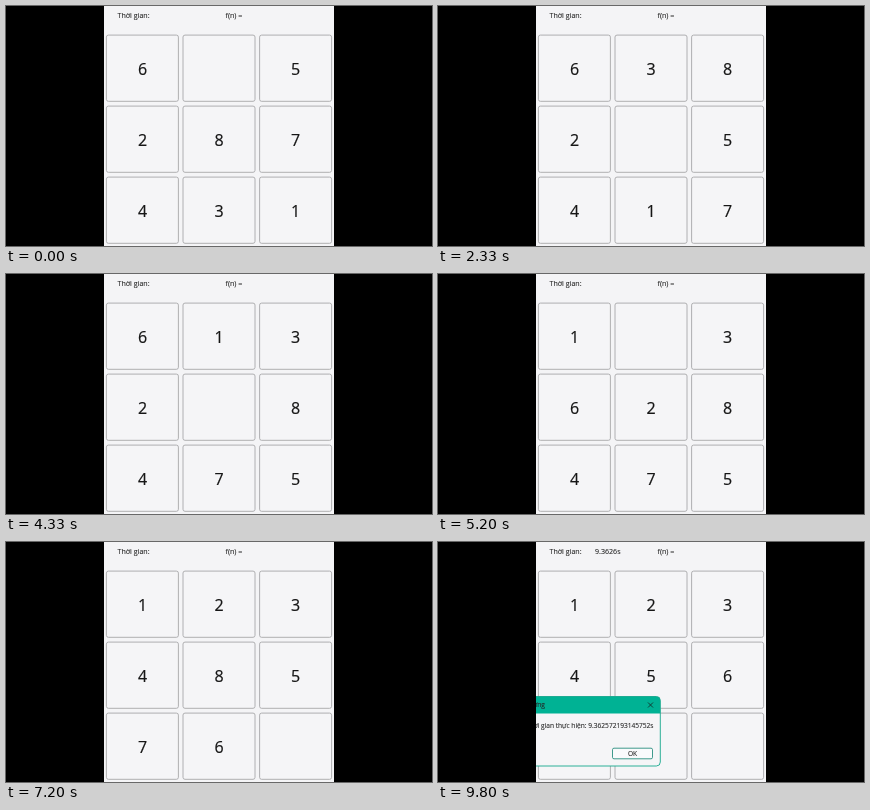
These frames come from a looping animation (426 by 240 pixels, 9870 ms). An HTML page:

```html
<!DOCTYPE html>
<html lang="vi">
<head>
<meta charset="utf-8">
<title>8-puzzle</title>
<style>
  html, body { margin: 0; width: 100%; height: 100%; overflow: hidden; background: #000; }
  svg { display: block; width: 100vw; height: 100vh; }
  text { font: 7.1px "Open Sans", "Noto Sans", sans-serif; fill: #262626; stroke: #262626; stroke-width: .1; }
  .tile rect { fill: #f5f5f7; stroke: #a8a8aa; stroke-width: .9; }
  .tile text { font-size: 16px; fill: #161616; stroke: #161616; stroke-width: .2; text-anchor: middle; }
  .dialog text { font-size: 6.6px; }
</style>
</head>
<body>
<svg viewBox="0 0 426 240">
  <defs>
    <clipPath id="window"><rect x="98" width="230" height="240"/></clipPath>
  </defs>
  <rect width="426" height="240" fill="#000"/>
  <g clip-path="url(#window)">
    <rect x="98" width="230" height="240" fill="#f4f4f6"/>
    <text x="111.5" y="12.3">Thời gian:</text>
    <text x="219.5" y="12.3">f(n) =</text>
    <g id="board"></g>
    <g class="done">
      <text x="157" y="12.3">9.3626s</text>
    </g>
    <g class="done dialog">
      <rect x="40" y="154.5" width="182.3" height="69.5" rx="4" fill="#f5f5f7"/>
      <path d="M40 171.5V154.5H218.3a4 4 0 0 1 4 4V171.5Z" fill="#00b294"/>
      <rect x="40" y="154.5" width="182.3" height="69.5" rx="4" fill="none" stroke="#16a78d" stroke-width=".9"/>
      <text x="107" y="165.3" text-anchor="end">Chúc mừng</text>
      <path d="M210 160.5l5 5m0-5l-5 5" stroke="#12332d" stroke-width=".9"/>
      <text x="215.5" y="185.5" text-anchor="end">Thời gian thực hiện: 9.362572193145752s</text>
      <rect x="174.5" y="206.2" width="40" height="10.6" rx="1.5" fill="#fafafc" stroke="#2b8f80" stroke-width=".9"/>
      <text x="194.5" y="214" text-anchor="middle">OK</text>
    </g>
  </g>
</svg>
<script>
  const LOOP = 9870, STEP = 312.5, DONE = 9300;
  const MOVES = "DDRUULD" + "DRUULD" + "LURDLD" + "RURD" + "LURD";
  const SHIFT = { U: -3, D: 3, L: -1, R: 1 };

  // Every board along the solution; the blank swaps with a neighbour.
  const boards = [[..."6 5287431"]];
  for (const move of MOVES) {
    const next = [...boards[boards.length - 1]];
    const from = next.indexOf(" "), to = from + SHIFT[move];
    next[from] = next[to];
    next[to] = " ";
    boards.push(next);
  }

  const board = document.getElementById("board");
  board.innerHTML = boards[0].map((_, i) => {
    const x = 100.4 + (i % 3) * 76.6, y = 29.1 + Math.floor(i / 3) * 71;
    return `<g class="tile"><rect x="${x}" y="${y}" width="72" height="66.2" rx="2"/>
      <text x="${x + 36.1}" y="${y + 39.8}"></text></g>`;
  }).join("");
  const labels = board.querySelectorAll("text");
  const done = document.querySelectorAll(".done");

  function draw(now) {
    const t = now % LOOP;
    const step = Math.min(MOVES.length, Math.floor(t / STEP));
    labels.forEach((label, i) => { label.textContent = boards[step][i]; });
    done.forEach(el => { el.style.display = t < DONE ? "none" : ""; });
  }

  const start = performance.now();
  function tick() {
    draw(performance.now() - start);
    requestAnimationFrame(tick);
  }
  tick();
</script>
</body>
</html>
```
